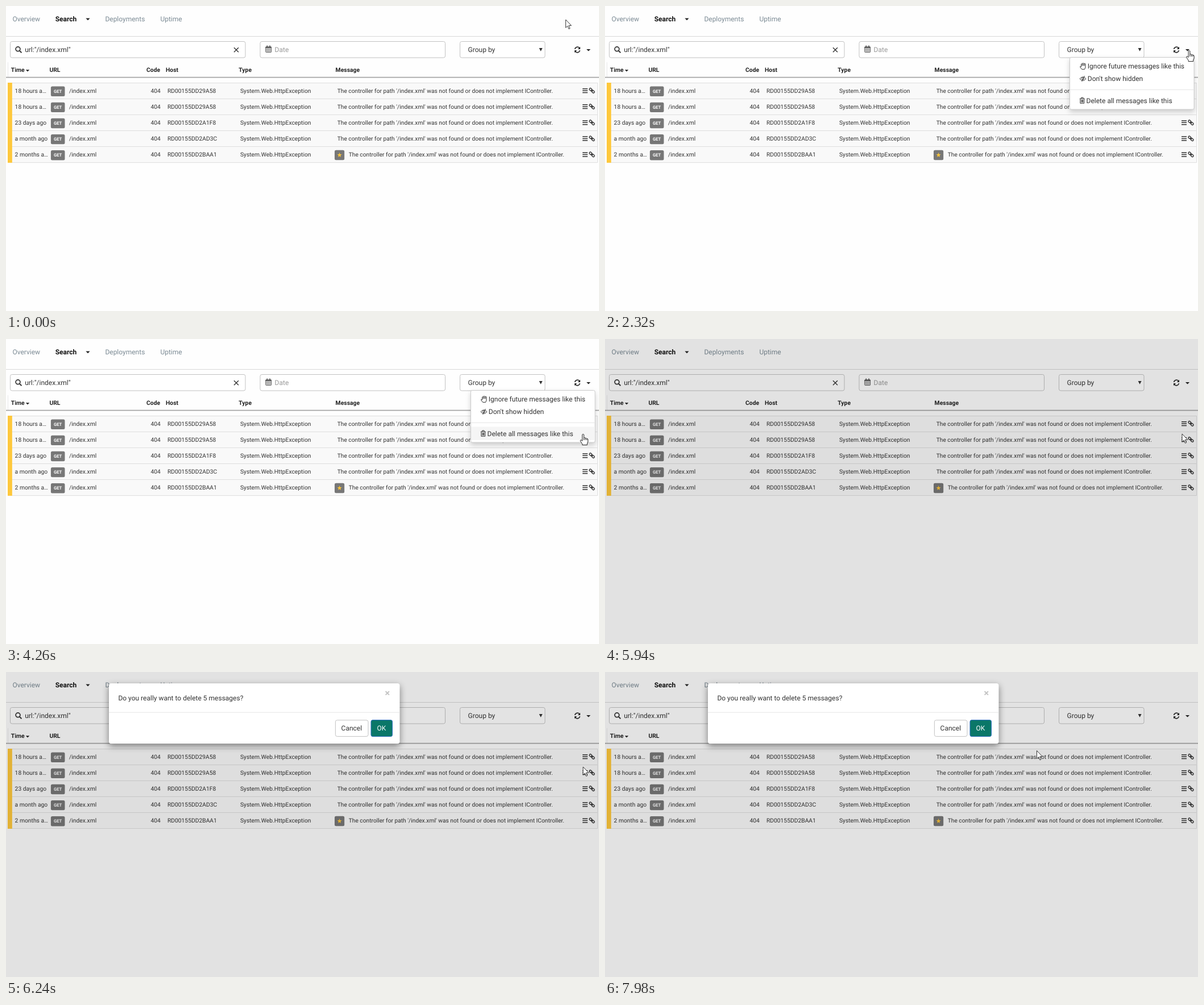
An HTML page that plays this animation: 1043 px wide and 537 px high, repeating every 8 s.

```html
<!DOCTYPE html>
<html lang="en">
<head>
<meta charset="utf-8">
<title>Delete messages</title>
<style>
html, body { margin: 0; width: 100%; height: 100%; overflow: hidden; background: #fefefe; }
svg { display: block; width: 1043px; height: 537px; font: 12px Roboto, sans-serif; text-rendering: geometricPrecision; }
text { fill: #333; white-space: pre; }
.head { font-size: 10.4px; font-weight: 700; fill: #222; }
.cell { font-size: 10.3px; }
.msg { font-size: 10.22px; }
.nav { fill: #7b8a94; }
.field { fill: #fff; stroke: #c2c2c2; }
.line { fill: none; stroke: #333; }
#menu > .box { filter: drop-shadow(0 4px 4px rgba(0, 0, 0, .18)); }
#dialog > .box { filter: drop-shadow(0 4px 6px rgba(0, 0, 0, .45)); }
</style>
</head>
<body>
<svg viewBox="0 0 1043 537">
  <defs>
    <g id="tools">
      <path class="line" stroke-width="1.5" d="M1014 -3.4h9M1014 0h9M1014 3.4h9"/>
      <g class="line" stroke-width="1.4" transform="translate(1030.5 -.2) rotate(42)">
        <rect x="-5.4" y="-1.8" width="5.2" height="3.6" rx="1.7"/>
        <rect x=".2" y="-1.8" width="5.2" height="3.6" rx="1.7"/>
        <path d="M-2 0h4"/>
      </g>
    </g>
    <path id="caret" d="M-3.6 0h7.2L0 3.7z" fill="#222"/>
  </defs>

  <g id="page">
    <text class="nav" x="11.4" y="26.5">Overview</text>
    <text x="86.7" y="26.5" font-weight="700" style="fill:#111">Search</text>
    <use href="#caret" x="144" y="21.6"/>
    <text class="nav" x="174.4" y="26.5">Deployments</text>
    <text class="nav" x="271.4" y="26.5">Uptime</text>
    <path d="M0 53.5h1043" stroke="#d8d8d8"/>

    <rect class="field" x="7.5" y="62.5" width="413.5" height="28.5" rx="3"/>
    <circle class="line" cx="21" cy="75.8" r="3.9" stroke-width="1.7"/>
    <path class="line" stroke-width="2" d="M23.8 78.6l3.6 3.6"/>
    <text x="33.2" y="81">url:"/index.xml"</text>
    <path class="line" stroke-width="1.4" d="M401 73.2l8 8m0-8l-8 8"/>

    <rect class="field" x="447" y="62.5" width="325.5" height="28.5" rx="3"/>
    <g class="line" style="stroke:#555">
      <rect x="456.8" y="71.8" width="9.8" height="9.6" rx=".6"/>
      <path d="M456.5 73.2h10.4" stroke-width="2"/>
      <path d="M459.3 69.6v3M464.1 69.6v3" stroke-width="1.6"/>
      <path d="M457 76.4h9.6M457 78.9h9.6M459.3 74v7.4M461.7 74v7.4M464.1 74v7.4" stroke-width=".6"/>
    </g>
    <text x="472.6" y="81" style="fill:#999">Date</text>

    <rect class="field" x="798.5" y="62.5" width="149.5" height="28.5" rx="3"/>
    <text x="812.6" y="81">Group by</text>
    <path d="M937.6 74h6l-3 5.8z" fill="#333"/>

    <path class="line" stroke-width="1.7" d="M1000.7 76a4.4 4.4 0 0 1 7.8-2.2M1009.3 78a4.4 4.4 0 0 1-7.8 2.2"/>
    <path d="M1010 71.8v4.2h-4.2zM1000 82.2v-4.2h4.2z" fill="#222"/>
    <use href="#caret" x="1024.5" y="75.9"/>

    <path d="M3.5 99v26" stroke="#e8e8e8"/>
    <path d="M0 125.6h1043" stroke="#a6a6a6" stroke-width="1.6"/>
    <use href="#caret" x="38" y="112.2" transform="translate(3.8 11.2) scale(.9)"/>
    <g id="rows"></g>
  </g>

  <g id="menu">
    <rect class="box" x="817.5" y="90.5" width="218.5" height="91.5" rx="2.5" fill="#fff" stroke="#ccc"/>
    <rect id="hover" x="818" width="217.5" fill="#f5f5f5"/>
    <path d="M818 147.5h217.5" stroke="#e5e5e5"/>
    <path class="line" stroke-linejoin="round" d="M837.6 107v-4.6q.9-1.3 1.8 0v-1.2q.9-1.3 1.9 0q1-1 1.9.3q1.1-.8 1.8.5v6l-1.4 3.4h-5l-3.2-4.4q.4-1.5 2.2 0M839.4 102v3.4M841.3 101.5v3.8M843.2 101.8v3.6"/>
    <path class="line" d="M835 128.2q5.5-6.6 11 0q-5.5 6.4-11 0zM843.5 123l-5 10"/>
    <circle class="line" cx="840.5" cy="127.8" r="1.9"/>
    <path class="line" d="M834.8 163.2h9M837.6 163v-1.8h3.4v1.8M835.9 163.5v7.8h6.8v-7.8M837.9 165v4.8M839.3 165v4.8M840.7 165v4.8"/>
    <text x="848.8" y="110">Ignore future messages like this</text>
    <text x="848.8" y="132.2">Don't show hidden</text>
    <text x="846.6" y="170.7">Delete all messages like this</text>
  </g>

  <rect id="shade" width="1043" height="537"/>

  <g id="dialog">
    <rect class="box" x="181" y="20" width="511.5" height="106.2" rx="4" fill="#fff"/>
    <path d="M181 71.2h511.5" stroke="#e5e5e5"/>
    <text x="197.4" y="49.5">Do you really want to delete 5 messages?</text>
    <path d="M667.6 34l6.4 6.4m0-6.4l-6.4 6.4" stroke="#c4c4c4" stroke-width="2"/>
    <rect class="field" x="579.4" y="84.8" width="57.6" height="28.6" rx="3"/>
    <text x="589.6" y="103.3">Cancel</text>
    <rect id="ok" x="642" y="84.6" width="37.6" height="29" rx="3"/>
    <text x="652.4" y="103.3" style="fill:#fff">OK</text>
  </g>

  <g id="cursor" fill="#fff" stroke="#222" stroke-linejoin="round">
    <path id="arrow" stroke-width=".9" d="M0 0V14.2L3.2 11.2L5.4 16.4L7.5 15.5L5.3 10.4H9.8z"/>
    <path id="hand" d="M-1.4 12.4V1.3Q0 -.4 1.4 1.3V7Q3 6 4 7.6Q5.6 6.9 6.4 8.4Q8.5 8 8.6 10V14L7.2 17V19.6H-1.4V17.6L-4.8 12.6Q-5 10.4 -3.2 10.8zM1.4 7v4M4 7.8v3.2M6.4 8.5v2.5"/>
  </g>
</svg>
<script>
const LOOP = 8000;
const $ = id => document.getElementById(id);
const label = (cls, x, y, s) => `<text class="${cls}" x="${x}" y="${y}">${s}</text>`;
const show = (id, on) => $(id).style.display = on ? '' : 'none';

const heads = [[8.8, 'Time'], [76.4, 'URL'], [247, 'Code'], [281, 'Host'], [409.3, 'Type'], [579.6, 'Message']];
const rows = [['18 hours a…', '29A58'], ['18 hours a…', '29A58'], ['23 days ago', '2A1F8'], ['a month ago', '2AD3C'], ['2 months a…', '2BAA1']];
const message = "The controller for path '/index.xml' was not found or does not implement IController.";
const star = Array.from({length: 10}, (_, i) => {
  const a = i * Math.PI / 5, r = i % 2 ? 1.8 : 4.3;
  return [586.6 + r * Math.sin(a), 262.4 - r * Math.cos(a)];
}).join(' ');

function table() {
  const rect = (x, y, w, h, fill, rx = 0) => `<rect x="${x}" y="${y}" width="${w}" height="${h}" rx="${rx}" fill="${fill}"/>`;
  let out = heads.map(([x, s]) => label('head', x, 115.8, s)).join('');
  out += rect(3, 135, 1038, 140.8, '#f9f9f9');
  rows.forEach(([age, host], i) => {
    const top = 135 + i * 28.12, y = top + 17.9;
    out += `<path d="M3 ${Math.round(top) + .5}h1038" stroke="#dedede"/>`
      + rect(78.9, top + 6.6, 24.6, 17.4, '#777', 2.5)
      + `<text x="91.2" y="${top + 18}" text-anchor="middle" font-size="7.7" font-weight="700" style="fill:#fff">GET</text>`
      + label('cell', 15.6, y, age) + label('cell', 111, y, '/index.xml') + label('cell', 254.4, y, '404')
      + label('cell', 283.9, y, 'RD00155DD' + host) + label('cell', 411.9, y, 'System.Web.HttpException')
      + label('msg', i == 4 ? 602.7 : 582.7, y, message)
      + `<use href="#tools" y="${top + 14.1}"/>`;
  });
  return out + '<path d="M3 275.6h1037.5V135" fill="none" stroke="#dedede"/>'
    + rect(3, 135, 7.8, 141, '#fec83b')
    + rect(578, 253.8, 17.2, 17.4, '#777', 2.5) + `<polygon points="${star}" fill="#fdc43a"/>`;
}
$('rows').innerHTML = table();

// Pointer path: time, x, y
const path = [
  [590, 984.5, 24], [1440, 1031, 74], [1630, 1031, 74], [1900, 1027.5, 77], [2079, 1027.5, 77], [2080, 1027.5, 78],
  [3000, 1027.5, 78], [3820, 1015, 152], [4260, 1015, 167], [6780, 1015, 167],
  [7120, 943.5, 159.5], [7580, 809, 144], [7980, 759.5, 138.5]
];
function pointer(t) {
  const n = path.findIndex(k => k[0] > t);
  if (n < 1) return path[n ? path.length - 1 : 0].slice(1);
  const [a, b] = [path[n - 1], path[n]], u = (t - a[0]) / (b[0] - a[0]);
  return [1, 2].map(i => a[i] + (b[i] - a[i]) * u);
}

const items = [[95, 22], [117, 22], [154.5, 23.5]];

function draw(t) {
  const [x, y] = pointer(t);
  const hand = t < 5610 && y > 62;
  $('cursor').setAttribute('transform', `translate(${x} ${y})`);
  show('hand', hand);
  show('arrow', !hand);

  const item = items.find(([top, h]) => y >= top && y < top + h);
  show('menu', t >= 2320 && t < 5770);
  show('hover', item);
  if (item) {
    $('hover').setAttribute('y', item[0]);
    $('hover').setAttribute('height', item[1]);
  }

  $('shade').setAttribute('opacity', t < 5770 ? 0 : t < 5850 ? .03 : t < 5940 ? .08 : .11);

  // The dialog drops in with coarse steps
  const drop = Math.min(1, Math.floor((t - 6030) / 70) / 3);
  show('dialog', t >= 6030);
  if (drop >= 0) {
    $('dialog').setAttribute('transform', `translate(0 ${-8.6 * (1 - drop) ** 1.6})`);
    $('dialog').setAttribute('opacity', drop ? 1 : .88);
  }
  $('ok').setAttribute('fill', drop < 1 ? '#1faa96' : '#0a7768');
  $('ok').setAttribute('stroke', drop < 1 ? '#1a9a88' : '#2f6fc0');
}

function frame() {
  draw(performance.now() % LOOP);
  requestAnimationFrame(frame);
}
frame();
</script>
</body>
</html>
```
